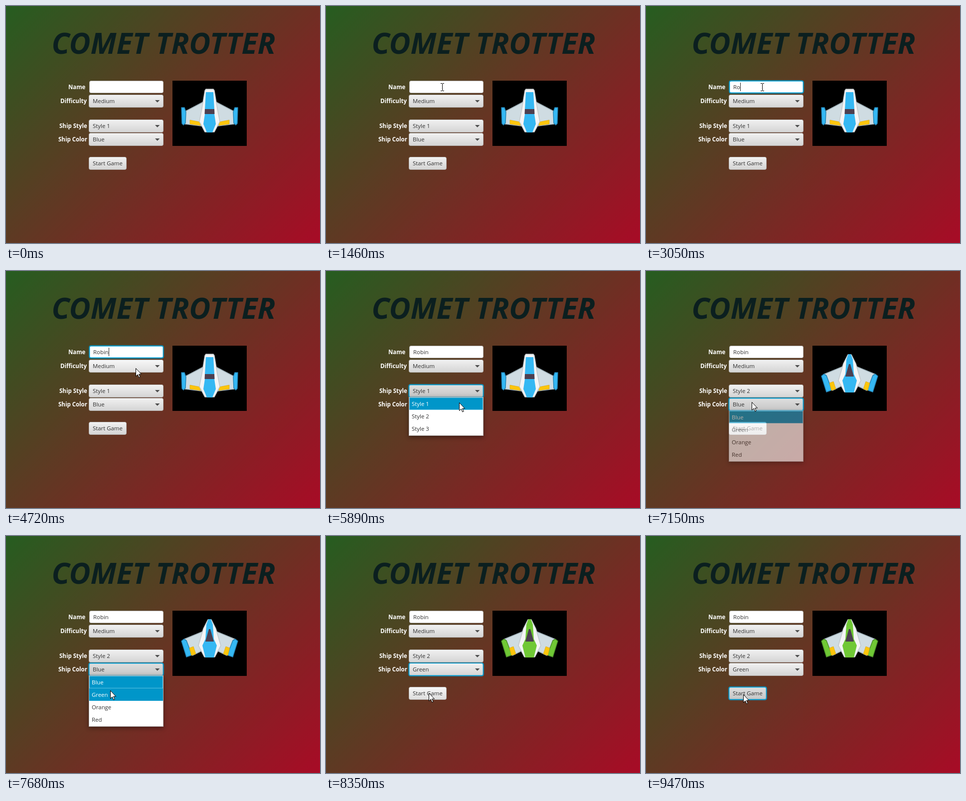
These frames come from a looping animation (630 px wide and 476 px high, 9.54 s). An HTML page:

```html
<!DOCTYPE html>
<html lang="en">
<head>
<meta charset="utf-8">
<title>Game menu</title>
<style>
  html, body { margin: 0; width: 100%; height: 100%; overflow: hidden; }
  body { background: linear-gradient(135deg, #265d20, #a80b26); }
  svg { position: absolute; left: 0; top: 0; display: block; }
  text { font: 11.4px "Open Sans", "Noto Sans", sans-serif; fill: #333; white-space: pre; }
  .title { font-size: 59px; font-weight: 700; font-style: italic; fill: #0b1f1f; text-anchor: middle; }
  .label { font-size: 11.5px; font-weight: 700; fill: #fff; }
  .box { fill: url(#idle); stroke: #b4b2b0; }
  .shine { stroke: #fbfbfb; stroke-opacity: .8; }
  .hover .box { fill: url(#hover); }
  .pressed .box { fill: url(#pressed); }
  .pressed .shine { stroke-opacity: .15; }
  .focus .box { stroke: #039ed3; stroke-width: 1.8; }
  .halo { fill: none; stroke: #039ed3; stroke-opacity: .2; stroke-width: 3; visibility: hidden; }
  .focus .halo { visibility: visible; }
  #name .box { fill: #fff; }
  .popup { filter: drop-shadow(0 3px 4px rgba(0, 0, 0, .4)); }
  .row { fill: none; }
  .on .row { fill: #0096c9; }
  .on text { fill: #fff; }
  .ring { fill: none; stroke: #5cc0e2; }
  .tint { fill: var(--tint); }
  .edge { fill: var(--tint); stroke: var(--shade); stroke-width: 1.5; stroke-linejoin: round; }
  .wing { fill: #cfdce2; stroke: #9eb0b8; stroke-width: 1.5; stroke-linejoin: round; }
  .hull { fill: #f3f4f5; stroke: #c3c9cc; stroke-width: 1.5; stroke-linejoin: round; }
  .gold { fill: #fdc60b; stroke: #d9a514; stroke-width: .7; }
  .glass { fill: #4c3f50; }
</style>
</head>
<body>
<svg width="630" height="476" viewBox="0 0 630 476">
  <defs>
    <linearGradient id="idle" x2="0" y2="1"><stop stop-color="#f1f1f1"/><stop offset="1" stop-color="#d4d4d4"/></linearGradient>
    <linearGradient id="hover" x2="0" y2="1"><stop stop-color="#f8f8f8"/><stop offset="1" stop-color="#dddddd"/></linearGradient>
    <linearGradient id="pressed" x2="0" y2="1"><stop stop-color="#dfdfdf"/><stop offset="1" stop-color="#c5c5c5"/></linearGradient>
    <g id="side1">
      <path class="wing" d="M399 191 359 212 359 237 392 241Z"/>
      <path class="gold" d="M369 229 390 233 390 240 369 237Z"/>
      <path class="edge" d="M352 204H358L361 213 360 235 356 239 353 236Z"/>
    </g>
    <g id="side2">
      <path class="wing" d="M397 191 358 207 374 240 396 229Z"/>
      <path class="edge" d="M352 211 357 207 362 210 373 239 362 243Z"/>
      <path class="gold" d="M368 225 376 222 381 237 372 240Z"/>
    </g>
  </defs>

  <text class="title" x="316" y="96">COMET TROTTER</text>
  <text class="label" x="125" y="167">Name</text>
  <text class="label" x="109" y="195">Difficulty</text>
  <text class="label" x="107" y="245">Ship Style</text>
  <text class="label" x="105" y="272">Ship Color</text>

  <path d="M334 150H483V281H334Z"/>
  <g id="ship1">
    <use href="#side1"/><use href="#side1" transform="matrix(-1 0 0 1 817 0)"/>
    <path class="hull" d="M399 170 401 167H416L418 170 424 206 429 232 418 253H399L388 232 393 206Z"/>
    <path class="tint" d="M401 173H416L418 207H399ZM399 217H418L421 237 414 254H403L396 237Z"/>
    <path class="glass" d="M399 207H418L418.500 217H398.500Z"/>
  </g>
  <g id="ship2">
    <use href="#side2"/><use href="#side2" transform="matrix(-1 0 0 1 817 0)"/>
    <path class="hull" d="M405 168H412L421 186 431 220 419 243H398L386 220 396 186Z"/>
    <path class="tint" d="M406 167H411L415 178 417 207 423 220 417 244H400L394 220 400 207 402 178Z"/>
    <path class="glass" d="M407 187H410L417 212H400Z"/>
  </g>

  <g id="name">
    <rect class="halo" x="167" y="150" width="149" height="25" rx="4"/>
    <rect class="box" x="167.500" y="150.500" width="148" height="24" rx="3"/>
    <text id="typed" x="175" y="167"></text>
    <path id="caret" d="M.5 154V171" stroke="#222"/>
  </g>
  <g id="widgets"></g>
  <g id="beam" fill="none" stroke="#000"><path d="M.5-7V7M-3-7.500H0M1-7.500H4M-3 7.500H0M1 7.500H4"/></g>
  <path id="arrow" d="M.5.5V16.500L4.200 13 6.800 19 9.200 18 6.600 12.200H11.500Z" fill="#fff" stroke="#000"/>
</svg>

<script>
const LOOP = 9540;
const $ = id => document.getElementById(id);

function button(id, y, w, label, arrow) {
  return `<g id="${id}">
    <rect class="halo" x="166" y="${y}" width="${w}" height="26" rx="4"/>
    <rect class="box" x="166.5" y="${y + .5}" width="${w - 1}" height="25" rx="3"/>
    <path class="shine" d="M168.5 ${y + 1.5}h${w - 5}"/>
    <text x="174" y="${y + 17}">${label}</text>
    ${arrow ? `<path d="M299 ${y + 11}h9.400l-4.700 4.700z" fill="#4d4d4d"/>` : ''}
  </g>`;
}

function popup(id, y, items) {
  const rows = items.map((item, i) => `<g>
    <rect class="row" x="167" y="${y + 1 + 25 * i}" width="148" height="25"/>
    ${i ? '' : `<rect class="ring" x="167.5" y="${y + 1.5}" width="147" height="24"/>`}
    <text x="172" y="${y + 18 + 25 * i}">${item}</text></g>`).join('');
  return `<g id="${id}" class="popup"><rect x="166.5" y="${y + .5}" width="149"
    height="${25 * items.length + 2}" fill="#fff" stroke="#b5b5b5"/>${rows}</g>`;
}

$('widgets').innerHTML =
  button('level', 178, 150, 'Medium', true) +
  button('style', 228, 150, 'Style 1', true) +
  button('color', 255, 150, 'Blue', true) +
  button('start', 303, 76, 'Start Game') +
  popup('styles', 253, ['Style 1', 'Style 2', 'Style 3']) +
  popup('colors', 280, ['Blue', 'Green', 'Orange', 'Red']);

// Pointer moves: first step, last step, step count, end point
const moves = [
  [790, 1130, 6, 230, 153], [1330, 1460, 3, 233, 163],
  [4570, 4720, 3, 260, 195], [4790, 5080, 5, 267, 239],
  [5640, 5890, 5, 267, 264], [5980, 6160, 4, 204, 300],
  [6630, 6840, 4, 212, 263], [7350, 7680, 6, 209, 310],
  [8350, 8530, 4, 195, 328], [8690, 8750, 2, 195, 318]
];
const keys = [[2730, 1], [3050, 2], [3250, 3], [3390, 5]];
const bounds = { level: [178, 316], style: [228, 316], color: [255, 316], start: [303, 242] };

function pointer(t) {
  let x = 526, y = 459;
  for (const [t0, t1, n, ex, ey] of moves) {
    if (t < t0) break;
    const k = Math.min(n, 1 + Math.floor((t - t0) * (n - 1) / (t1 - t0) + 1e-6)) / n;
    x += (ex - x) * k;
    y += (ey - y) * k;
  }
  return [Math.round(x), Math.round(y)];
}

const show = (id, on) => { $(id).style.display = on ? '' : 'none'; };
const label = (id, s) => { $(id).querySelector('text').textContent = s; };

function drawPopup(id, top, t, from, to, y) {
  const open = t >= from && t < to;
  show(id, open);
  $(id).style.opacity = t < from + 60 ? .6 : 1;
  const over = Math.floor((y - top - 1) / 25);
  $(id).querySelectorAll('g').forEach((row, i) => row.classList.toggle('on', i === 0 || i === over));
  return open;
}

function draw(t) {
  const [x, y] = pointer(t);
  const inField = x >= 167 && x < 316 && y >= 150 && y < 176;
  const place = `translate(${x} ${y})`;
  show('beam', t >= 790 && inField);
  show('arrow', t >= 790 && !inField);
  $('beam').setAttribute('transform', place);
  $('arrow').setAttribute('transform', place);

  const focus = t < 1600 ? '' : t < 5160 ? 'name' : t < 7090 ? 'style' : t < 9270 ? 'color' : 'start';
  const styleOpen = drawPopup('styles', 253, t, 5230, 6350, y);
  const colorOpen = drawPopup('colors', 280, t, 7150, 7960, y);
  const down = {
    style: t >= 5160 && t < 6350,
    color: t >= 7090 && t < 7960,
    start: t >= 9270
  };
  $('name').classList.toggle('focus', focus === 'name');
  for (const id in bounds) {
    const [top, right] = bounds[id];
    const over = t >= 790 && !styleOpen && !colorOpen &&
      x >= 166 && x < right && y >= top && y < top + 26;
    const list = $(id).classList;
    list.toggle('focus', focus === id);
    list.toggle('hover', over);
    list.toggle('pressed', !!down[id]);
  }

  let count = 0;
  for (const [at, n] of keys) if (t >= at) count = n;
  $('typed').textContent = 'Robin'.slice(0, count);
  const blink = (t >= 2190 && t < 2530) || (t >= 3930 && t < 4370) || t >= 4870;
  show('caret', focus === 'name' && !blink);
  const end = count ? Math.round($('typed').getComputedTextLength()) : 0;
  $('caret').setAttribute('transform', `translate(${175 + end} 0)`);

  const second = t >= 6350, green = t >= 7960;
  label('style', second ? 'Style 2' : 'Style 1');
  label('color', green ? 'Green' : 'Blue');
  show('ship1', !second);
  show('ship2', second);
  const look = document.body.style;
  look.setProperty('--tint', green ? '#70c835' : '#35b8f3');
  look.setProperty('--shade', green ? '#4c8f2a' : '#2383b5');
}

const begin = performance.now();
function tick() {
  draw((performance.now() - begin) % LOOP);
  requestAnimationFrame(tick);
}
tick();
</script>
</body>
</html>
```
